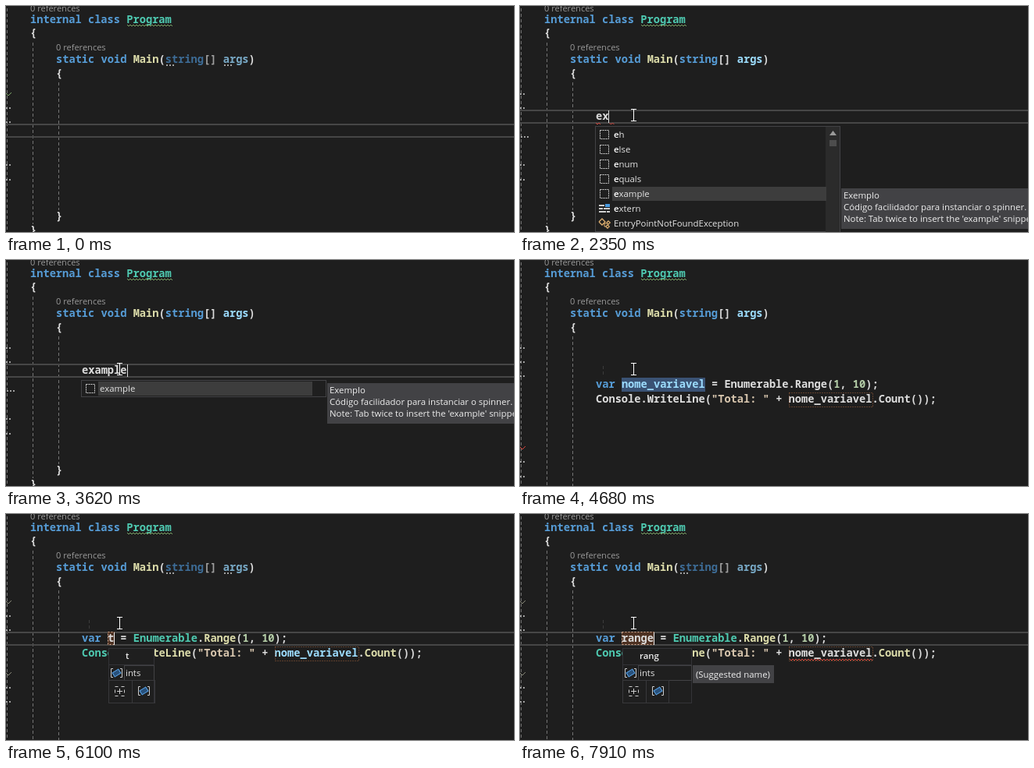
Write an HTML page with a canvas that moves like this. It is 650 px wide and 290 px high and loops after 8000 ms.

```html
<!DOCTYPE html>
<html lang="en">
<head>
<meta charset="utf-8">
<title>Code snippet in an editor</title>
<style>
html, body { margin: 0; width: 100%; height: 100%; overflow: hidden; background: #1e1e1e; }
canvas { display: block; }
</style>
</head>
<body>
<canvas id="stage" width="650" height="290"></canvas>
<script>
const ctx = document.getElementById('stage').getContext('2d');
const LOOP = 8000, CW = 8.22;
const CODE = "600 13.7px 'Noto Sans Mono', 'DejaVu Sans Mono', monospace";
const UI = "11.4px 'Open Sans', 'Noto Sans', sans-serif";
const LENS = "11.05px 'Open Sans', 'Noto Sans', sans-serif";
const C = {
  bg: '#1e1e1e', key: '#569cd6', type: '#4ec9b0', fn: '#dcdcaa', arg: '#9cdcfe', txt: '#dcdcdc',
  str: '#d8c6ae', num: '#b5cea8', dim: '#3d6c96', gray: '#999', line: '#464646', edge: '#424245',
  panel: '#1f1f1f', red: '#d8483f', green: '#7fa86a', orange: '#a0603a'
};

// Value of the last [time, value] step reached at t
const at = (t, steps) => steps.reduce((v, s) => t >= s[0] ? s[1] : v, steps[0][1]);
const within = (t, a, b) => t >= a && t < b;

const typed = [[0, ''], [1620, 'e'], [2080, 'ex'], [2550, 'exx'], [3090, 'ex'], [3200, 'exa'],
  [3300, 'exam'], [3410, 'examp'], [3510, 'exampl'], [3620, 'example']];
const renamed = [[0, 'nome_variavel'], [5760, 't'], [6770, ''], [6970, 'r'], [7240, 'ra'],
  [7500, 'ran'], [7840, 'rang'], [7910, 'range']];

const eList = ['sq:eh', 'sq:else', 'sq:enum', 'sq:equals', 'sq:example', 'key:extern', 'cls:EntryPointNotFoundException'];
const exList = ['sq:example', 'key:extern', 'sq:Exception', 'cls:ExecutionEngineException', 'ns:Exemplo',
  'sq:Extractor', 'cls:AccessViolationException'];

function rect(x, y, w, h, fill, stroke) {
  if (fill) { ctx.fillStyle = fill; ctx.fillRect(x, y, w, h); }
  if (stroke) { ctx.strokeStyle = stroke; ctx.lineWidth = 1; ctx.strokeRect(x + .5, y + .5, w - 1, h - 1); }
}
function text(s, x, y, color, font = UI) {
  ctx.font = font;
  ctx.fillStyle = color;
  ctx.fillText(s, x, y);
  return ctx.measureText(s).width;
}
function code(x, y, ...parts) {
  for (const [s, color] of parts) {
    text(s, x, y, color, CODE);
    x += s.length * CW;
  }
}
function path(points, color, width = 1, dash = []) {
  ctx.strokeStyle = color;
  ctx.lineWidth = width;
  ctx.setLineDash(dash);
  ctx.beginPath();
  points.forEach(([x, y]) => ctx.lineTo(x, y));
  ctx.stroke();
  ctx.setLineDash([]);
}
function wave(x, end, y, color) {
  const points = [];
  for (let i = 0; x + i * 2 <= end; i++) points.push([x + i * 2, y + (i % 2 ? 1 : -1)]);
  path(points, color);
}
function dots(x, y, n) {
  for (let i = 0; i < n; i++) rect(x + i * 4, y, 2, 2, '#a0a0a0');
}
const guide = (x, y, end) => path([[x + .5, y], [x + .5, end]], '#747474', 1, [4, 3]);

function currentLine(y) {
  rect(0, y, 650, 2, C.line);
  rect(0, y + 16, 650, 2, C.line);
}

function margin(t) {
  const [marks, chevrons, color] = at(t, [
    [0, [[130, 148, 203, 222], [113], C.green]],
    [1750, [[112, 130, 203, 222], [], '']],
    [4220, [[112, 130, 148, 258, 277], [241], C.red]],
    [5010, [[130, 148, 222, 240], [113, 205], '#8a8a7a']]
  ]);
  marks.forEach(y => dots(0, y, 2));
  if (within(t, 1750, 4220)) dots(1, 167, 3);
  chevrons.forEach(y => path([[0, y - 1], [3, y + 2], [7, y - 2]], color));
}

function frame(t) {
  const open = t >= 4220, hinted = !within(t, 2080, 5360);
  guide(1, 3, 290);
  guide(34, 47, open ? 290 : 280);
  guide(67, 98, open ? 290 : 262);
  text('0 references', 31, 7, C.gray, LENS);
  code(31, 22, ['internal class ', C.key], ['Program', C.type]);
  wave(155, 213, 25, C.green);
  code(31, 39, ['{', C.txt]);
  text('0 references', 64, 57, C.gray, LENS);
  code(64, 73, ['static void ', C.key], ['Main', C.fn], ['(', C.txt], ['string', hinted ? C.dim : C.key],
    ['[]', hinted ? '#a0a0a0' : C.txt], [' args', hinted ? '#78a9c6' : C.arg], [')', C.txt]);
  if (hinted) dots(205, 75, 3);
  if (t < 2080 || within(t, 5360, 6360)) dots(279, 75, 3);
  code(64, 91, ['{', C.txt]);
  if (!open) {
    code(64, 274, ['}', C.txt]);
    code(31, 292, ['}', C.txt]);
  }
  margin(t);
}

function icon(kind, x, y) {
  if (kind === 'sq') {
    ctx.setLineDash([2, 1]);
    rect(x, y - 6, 12, 12, null, '#d0d0d0');
    ctx.setLineDash([]);
  } else if (kind === 'key') {
    rect(x - 1, y - 5, 7, 2, '#d0d0d0');
    rect(x + 7, y - 6, 6, 4, '#4a9be0');
    rect(x - 1, y - 1, 5, 2, '#d0d0d0');
    rect(x + 5, y - 1, 8, 2, '#d0d0d0');
    rect(x - 1, y + 3, 9, 2, '#d0d0d0');
    rect(x + 9, y + 3, 4, 2, '#d0d0d0');
  } else if (kind === 'cls') {
    const diamond = (a, b, r) => path([[a - r, b], [a, b - r], [a + r, b], [a, b + r], [a - r, b]], '#e0b070', 1.3);
    diamond(x + 3, y - 2, 4);
    diamond(x + 11, y - 1, 2.2);
    diamond(x + 10, y + 4, 2.2);
    path([[x + 5, y], [x + 9, y]], '#e0b070');
    path([[x + 6, y], [x + 6, y + 4], [x + 8, y + 4]], '#e0b070');
  } else {
    text('{ }', x, y + 4, '#d0d0d0');
  }
}

function list(items, chosen, soft, boldE, thumb) {
  const h = items.length * 19 + 3;
  rect(96, 154, 314, h, C.panel, C.edge);
  if (thumb) {
    rect(391, 155, 18, h - 1, '#2b2b2b');
    ctx.fillStyle = '#9a9a9a';
    ctx.beginPath();
    ctx.moveTo(396, 166);
    ctx.lineTo(400.5, 160);
    ctx.lineTo(405, 166);
    ctx.fill();
    rect(396, 172, 9, thumb, '#4d4d4d');
  }
  items.forEach((item, i) => {
    const y = 165 + i * 19, [kind, name] = item.split(':');
    if (i === chosen) rect(118, y - 9, 274, 18, soft ? null : '#3d3d3d', soft ? '#3f3f42' : null);
    icon(kind, 102, y);
    let x = 120, rest = name;
    if (boldE && name[0] === 'e') {
      x += text('e', x, y + 4, '#fff', '600 ' + UI);
      rest = name.slice(1);
    }
    text(rest, x, y + 4, '#e4e4e4');
  });
}

function snippetTip(y) {
  rect(411, y, 240, 52, C.edge);
  ['Exemplo', 'Código facilidador para instanciar o spinner.',
    "Note: Tab twice to insert the 'example' snippet."].forEach((s, i) => text(s, 414, y + 13 + i * 15, '#eee'));
}

function typing(t) {
  const word = at(t, typed), x = 97, end = x + word.length * CW;
  currentLine(t < 630 ? 151 : 133);
  code(x, 146, [word, C.txt]);
  if (within(t, 2080, 3620)) {
    wave(97, 104, 151, C.red);
    wave(end + 1, end + 8, 151, C.red);
  }
  if (within(t, 630, 1160) || within(t, 1620, 2950) || t >= 3090) rect(Math.round(end), 134, 1, 16, '#ddd');
  if (within(t, 1750, 2420)) list(eList, 4, false, true, 8);
  else if (within(t, 2420, 3200)) list(exList, 0, within(t, 2620, 3090), false, 18);
  else if (t >= 3200) list(['sq:example'], 0, false, false, 0);
  if (within(t, 2150, 2420)) snippetTip(234);
  else if (within(t, 2420, 2550) || t >= 3200) snippetTip(158);
}

function tagIcon(x, y) {
  path([[x + 3, y - 5.5], [x + .5, y - 5.5], [x + .5, y + 5.5], [x + 3, y + 5.5]], '#ccc');
  path([[x + 12, y - 5.5], [x + 14.5, y - 5.5], [x + 14.5, y + 5.5], [x + 12, y + 5.5]], '#ccc');
  ctx.save();
  ctx.translate(x + 7.5, y);
  ctx.rotate(-.55);
  rect(-5, -3.5, 10, 7, '#28517c', '#5aa2e4');
  ctx.restore();
}

function namePopup(t) {
  const w = t >= 7240 ? 89 : 59;
  rect(131, 172, w, 71, C.panel, '#333337');
  text(at(t - 60, renamed), 153, 186, '#eee', '600 ' + UI);
  rect(131, 193, w, 1, '#333337');
  tagIcon(134, 204);
  rect(151, 194, w - 20, 20, null, '#424245');
  text('ints', 153, 208, '#e4e4e4');
  rect(131, 213, 31, 30, null, '#38383b');
  rect(161, 213, 30, 30, null, '#38383b');
  ctx.setLineDash([4, 4]);
  rect(139, 221, 13, 13, null, '#ccc');
  ctx.setLineDash([]);
  path([[142, 227.5], [149, 227.5]], '#ccc');
  path([[145.5, 224], [145.5, 231]], '#ccc');
  tagIcon(169, 227);
  if (within(t, 6360, 6770) || t >= 7240) {
    rect(w + 132, 194, 104, 23, C.edge);
    text('(Suggested name)', w + 136, 210, '#eee');
  }
}

function snippet(t) {
  const name = at(t, renamed), editing = t >= 5760, colored = t >= 4850;
  const tint = c => colored ? c : C.txt, w = name.length * CW;
  const missing = within(t, 6360, 6770) || t >= 7240;
  if (editing) currentLine(151);
  path([[106.5, 136], [106.5, 148]], '#3c3c3c', 1, [4, 3]);

  if (editing) {
    rect(130, 151, w + 1, 17, '#4d3122');
    ctx.setLineDash([2, 2]);
    rect(130, 151, Math.round(w) + 1, 17, null, '#d8b098');
    ctx.setLineDash([]);
  } else {
    rect(130, 151, 107, 18, '#3a5274');
  }
  code(97, 164, ['var ', C.key], [name, editing ? C.txt : C.arg], [' = ', C.txt], ['Enumerable', tint(C.type)],
    ['.', C.txt], ['Range', tint(C.fn)], ['(', C.txt], ['1', C.num], [', ', C.txt], ['10', C.num], [');', C.txt]);
  if (editing && !within(t, 6360, 6770)) rect(Math.round(130 + w), 152, 1, 16, '#eee');

  code(97, 183, ['Console', tint(C.type)], ['.', C.txt], ['WriteLine', tint(C.fn)], ['(', C.txt],
    ['"Total: "', C.str], [' + ', C.txt], ['nome_variavel', missing ? C.txt : tint(C.arg)], ['.', C.txt],
    ['Count', tint(C.fn)], ['());', C.txt]);
  ctx.setLineDash([1, 2]);
  rect(344, 170, 108, 19, null, C.orange);
  ctx.setLineDash([]);
  if (missing) wave(345, 451, 187, C.red);
  if (t >= 5900) namePopup(t);
}

function mouse(t) {
  if (t < 70) return;
  const k = Math.min(1, (t - 70) / 560), e = 1 - (1 - k) ** 2;
  const x = Math.round(640 - 495 * e), y = Math.round(259 - 119 * e);
  path([[x + .5, y - 7], [x + .5, y + 7]], '#fff');
  for (const dy of [-7.5, 7.5]) path([[x - 3, y + dy], [x + 4, y + dy]], '#fff');
}

function draw(t) {
  rect(0, 0, 650, 290, C.bg);
  frame(t);
  (t < 4220 ? typing : snippet)(t);
  mouse(t);
}

const start = performance.now();
function tick() {
  draw((performance.now() - start) % LOOP);
  requestAnimationFrame(tick);
}
tick();
</script>
</body>
</html>
```
